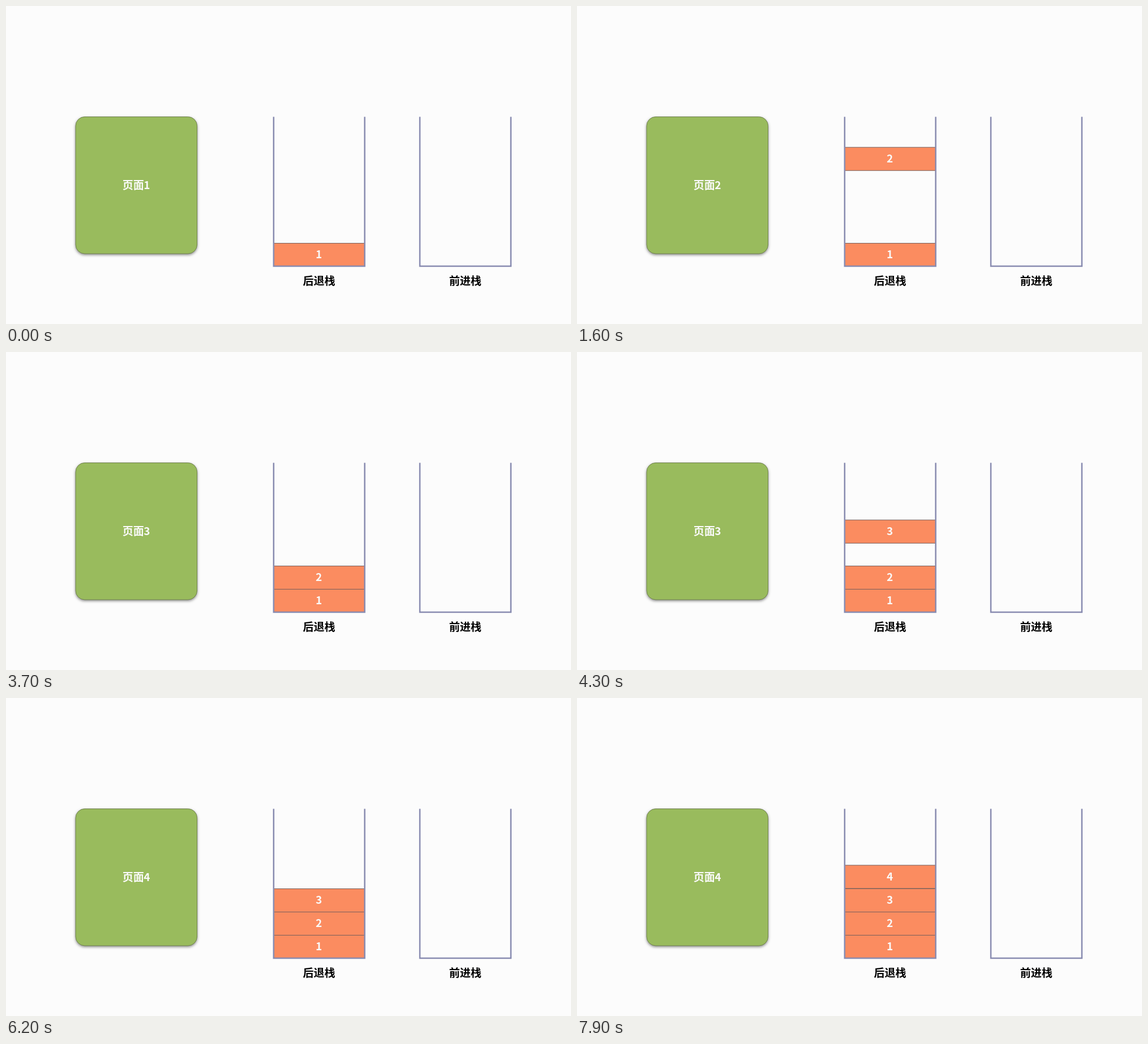
Write an HTML page with a canvas that moves like this. It is 998 by 561 pixels and loops after 8000 ms.

```html
<!DOCTYPE html>
<html lang="zh-CN">
<head>
<meta charset="utf-8">
<title>后退栈与前进栈</title>
<style>
  html, body { margin: 0; width: 100%; height: 100%; overflow: hidden; background: #fcfcfc; }
  canvas { display: block; }
</style>
</head>
<body>
<canvas width="998" height="561"></canvas>
<script>
const ctx = document.querySelector('canvas').getContext('2d');
const LOOP = 8000, STEP = 100;
const BLOCK_HEIGHT = 41, HIDDEN_TOP = -41;

// Each block falls from above the stage onto its resting top edge.
const blocks = [
  { label: '1', rest: 418.5, start: -1000, duration: 600 },
  { label: '2', rest: 377.5, start: 1355, duration: 650 },
  { label: '3', rest: 336.5, start: 3945, duration: 600 },
  { label: '4', rest: 295, start: 6857, duration: 650 },
];
const pageChanges = [600, 3000, 5400];
const FADE = 500;

const clamp = x => Math.min(1, Math.max(0, x));
const easeOut = u => 1 - (1 - u) ** 2.5;

function text(str, x, baseline, color, align = 'center') {
  ctx.fillStyle = color;
  ctx.textAlign = align;
  ctx.fillText(str, x, baseline);
}

function drawPage(t) {
  ctx.beginPath();
  ctx.roundRect(123, 195.5, 214.5, 241.5, 16);
  ctx.save();
  ctx.shadowColor = 'rgba(0, 0, 0, 0.5)';
  ctx.shadowBlur = 5;
  ctx.shadowOffsetY = 2;
  ctx.fillStyle = '#99bb5d';
  ctx.fill();
  ctx.restore();
  ctx.strokeStyle = '#71834f';
  ctx.lineWidth = 1;
  ctx.stroke();

  text('页面', 205.7, 322.5, '#fafafa', 'left');
  const shown = i => i < 0 ? 1 : i >= pageChanges.length ? 0 : clamp((t - pageChanges[i]) / FADE);
  for (let i = 0; i < 4; i++) {
    ctx.globalAlpha = shown(i - 1) * (1 - shown(i));
    text(String(i + 1), 248.8, 322.5, '#fafafa');
  }
  ctx.globalAlpha = 1;
}

function drawBlock({ label, rest, start, duration }, t) {
  if (t < start) return;
  const top = HIDDEN_TOP + (rest - HIDDEN_TOP) * easeOut(clamp((t - start) / duration));
  ctx.fillStyle = '#fb8c60';
  ctx.strokeStyle = '#77605c';
  ctx.lineWidth = 1;
  ctx.fillRect(473, top, 160.5, BLOCK_HEIGHT);
  ctx.strokeRect(473, top, 160.5, BLOCK_HEIGHT);
  text(label, 552.5, top + 26.5, '#fafafa');
}

function drawStack(left, label) {
  ctx.strokeStyle = '#888bb0';
  ctx.lineWidth = 2.5;
  ctx.beginPath();
  ctx.moveTo(left, 195.5);
  ctx.lineTo(left, 459);
  ctx.lineTo(left + 160.8, 459);
  ctx.lineTo(left + 160.8, 195.5);
  ctx.stroke();
  text(label, left + 80.2, 492, '#000');
}

function draw(now) {
  const t = Math.floor(now % LOOP / STEP) * STEP;
  ctx.fillStyle = '#fcfcfc';
  ctx.fillRect(0, 0, 998, 561);
  ctx.font = 'bold 19px "Noto Sans CJK SC", "Noto Sans CJK", sans-serif';
  drawPage(t);
  blocks.forEach(block => drawBlock(block, t));
  drawStack(472.8, '后退栈');
  drawStack(731, '前进栈');
  requestAnimationFrame(draw);
}
requestAnimationFrame(draw);
</script>
</body>
</html>
```
